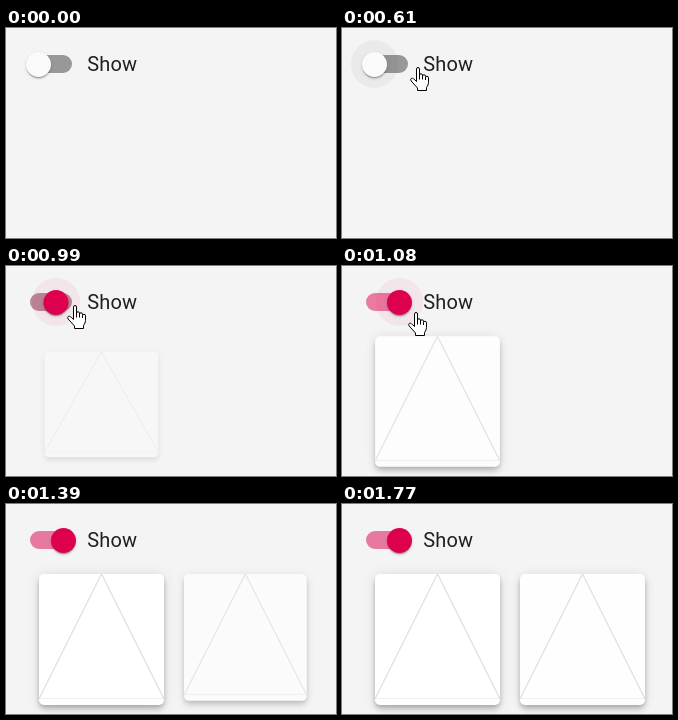
Animation, 330 px wide and 210 px high, one loop 2330 ms. Source, as an HTML page:

```html
<!DOCTYPE html>
<html lang="en">
<head>
<meta charset="utf-8">
<style>
  html, body { margin: 0; width: 100%; height: 100%; overflow: hidden; background: #f4f4f4; }
  div, svg { position: absolute; }
  #track { left: 23.75px; top: 27.25px; width: 42.5px; height: 17.5px; border-radius: 9px; }
  #halo { border-radius: 50%; }
  #thumb {
    left: 20px; top: 23.5px; width: 25px; height: 25px; border-radius: 50%;
    box-shadow: 0 2.5px 1.25px -1.25px #0003, 0 1.25px 1.25px #00000024, 0 1.25px 3.75px #0000001f;
  }
  #label {
    left: 81.25px; top: 21px; color: rgba(0, 0, 0, .87);
    font: 20px/30px Roboto, sans-serif; letter-spacing: .00938em;
  }
  .card {
    top: 70px; width: 125px; height: 131px; border-radius: 5px; background: #fff;
    box-shadow: 0 2.5px 5px -1.25px #0003, 0 5px 6.25px #00000024, 0 1.25px 12.5px #0000001f;
  }
  .card svg { left: 0; top: 0; }
  #one { left: 33px; transform-origin: 50% 61.5%; }
  #two { left: 178px; transform-origin: 0 0; }
  #cursor { left: 0; top: 0; fill: #fff; stroke: #000; }
</style>
</head>
<body>
<div id="track"></div>
<div id="halo"></div>
<div id="thumb"></div>
<div id="label">Show</div>
<div class="card" id="one"></div>
<div class="card" id="two"></div>
<svg id="cursor" width="330" height="210">
  <path id="hand" stroke-linejoin="round" d="M6.5 14.5V2Q6.5 .5 8 .5T9.5 2V8Q9.5 6.8 11 6.8T12.5 8.3V9Q12.5 7.8 14 7.8T15.5 9.3V10.5Q15.5 9.3 17 9.3T18.5 10.8V15.5Q18.5 18 16.5 20.5V23.5H7.5V21L1.2 14Q-.2 11.8 1.6 11.2Q3 10.8 6.5 14.5M9.5 8V12.5M12.5 9V12.5M15.5 10.5V13"/>
  <path id="arrow" d="M.5 .7V16.5L4.2 13L6.8 19L9.3 18L6.7 12.2H11.8Z"/>
</svg>
<script>
const LOOP = 2330, STEP = 77, CLICK = 934;
const $ = id => document.getElementById(id);
const mix = (a, b, p) => a + (b - a) * p;

// cursor path: step, x, y
const path = [[1, 201, 178], [4, 109, 59], [7, 77, 39], [8, 76, 39],
  [13, 69, 39], [14, 74, 46], [16, 174, 167], [17, 222, 212]];

for (const card of document.querySelectorAll('.card'))
  card.innerHTML = '<svg width="125" height="125"><path d="M0 125L62.5 0L125 125Z" ' +
    'fill="#fff" stroke="#e0e0e0" stroke-width="1.25"/></svg>';

// cubic-bezier(.4, 0, .2, 1), solved by bisection
function ease(x) {
  if (x <= 0) return 0;
  if (x >= 1) return 1;
  let lo = 0, hi = 1, s;
  for (let i = 0; i < 20; i++) {
    s = (lo + hi) / 2;
    const q = 1 - s;
    if (1.2 * q * q * s + .6 * q * s * s + s ** 3 < x) lo = s; else hi = s;
  }
  return 3 * (1 - s) * s * s + s ** 3;
}

function grow(id, age, duration, fromY) {
  const p = ease(age / (duration * .666));
  $(id).style.opacity = ease(age / duration);
  $(id).style.transform = `scale(${mix(.75, 1, p)}, ${mix(fromY, 1, p)})`;
}

function drawSwitch(n, age) {
  const p = ease(age / 150), on = age > 0, tint = p * p;
  $('thumb').style.transform = `translateX(${25 * p}px)`;
  $('thumb').style.background = on ? '#dc004e' : '#fafafa';
  $('track').style.background =
    `rgba(${220 * tint}, 0, ${78 * tint}, ${mix(.38, .5, tint)})`;

  let alpha = 0;
  if (n >= 8) alpha = n < 11 ? .04 : n < 16 ? .06 : n === 16 ? .08 : n === 17 ? .03 : 0;
  const r = n > 15 ? 21 : 23.75;
  Object.assign($('halo').style, {
    left: 32.5 + 25 * p - r + 'px', top: 36 - r + 'px',
    width: 2 * r + 'px', height: 2 * r + 'px',
    background: `rgba(${on ? '220, 0, 78' : '0, 0, 0'}, ${alpha})`
  });
}

function drawCursor(n) {
  const i = path.findIndex(k => k[0] >= n);
  $('cursor').style.display = n < 1 || i < 0 ? 'none' : 'block';
  if (n < 1 || i < 0) return;
  const b = path[i], a = path[Math.max(0, i - 1)];
  const p = a === b ? 0 : (n - a[0]) / (b[0] - a[0]);
  const x = Math.round(mix(a[1], b[1], p)), y = Math.round(mix(a[2], b[2], p));
  const pointing = n > 3 && n < 15;
  $('hand').style.display = pointing ? '' : 'none';
  $('arrow').style.display = pointing ? 'none' : '';
  $('hand').setAttribute('transform', `translate(${x - 8} ${y})`);
  $('arrow').setAttribute('transform', `translate(${x} ${y})`);
}

const start = performance.now();
function draw() {
  const t = (performance.now() - start) % LOOP;
  const n = Math.min(23, Math.floor((t + 11) / STEP));
  const age = n * STEP - CLICK;
  drawSwitch(n, age);
  grow('one', age, 242, .45);
  grow('two', n > 14 ? age : 0, 1000, .5625);
  drawCursor(n);
  requestAnimationFrame(draw);
}
draw();
</script>
</body>
</html>
```
